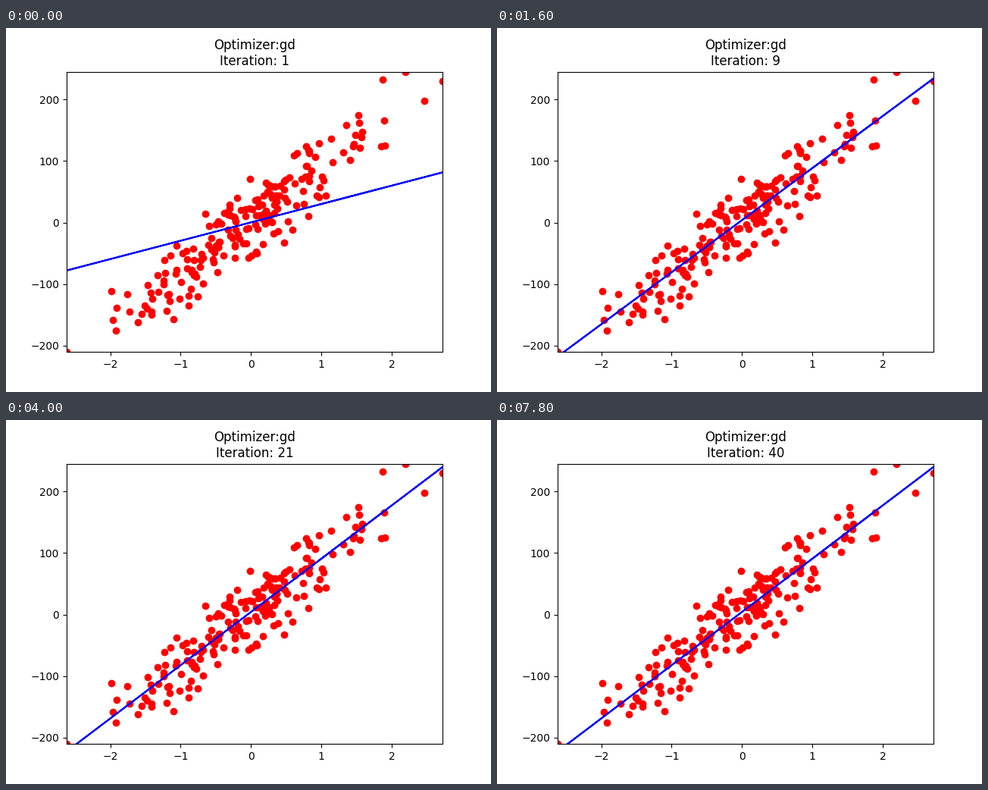
Animation, 640 px wide and 480 px high, one loop 8000 ms. Source, as a matplotlib script:

```python
import numpy as np
import matplotlib.pyplot as plt
from matplotlib.animation import FuncAnimation

FRAMES = 40
INTERVAL = 200
RATE = 0.4
NOISE = 30


def make_data(count=200, seed=42):
    """Noisy linear data: normal x, random slope, then shuffled."""
    rng = np.random.RandomState(seed)
    x = rng.standard_normal(count)
    slope = 100 * rng.uniform()
    y = slope * x + rng.normal(scale=NOISE, size=count)
    order = np.arange(count)
    rng.shuffle(order)
    return x[order], y[order]


def descend(x, y, steps):
    """Weights (bias, slope) after each gradient descent step."""
    design = np.column_stack([np.ones_like(x), x])
    weights = np.zeros(2)
    history = []
    for _ in range(steps):
        weights = weights - RATE * design.T @ (design @ weights - y) / len(x)
        history.append(weights)
    return history


x, y = make_data()
history = descend(x, y, FRAMES)

fig, ax = plt.subplots(figsize=(6.4, 4.8), dpi=100)
ax.scatter(x, y, color="red")
line, = ax.plot([], [], color="blue")
ax.set_xlim(x.min(), x.max())
ax.set_ylim(y.min(), y.max())
title = ax.set_title("")


def update(i):
    bias, slope = history[i]
    line.set_data(x, bias + slope * x)
    title.set_text(f"Optimizer:gd\nIteration: {i + 1}")
    return line, title


anim = FuncAnimation(fig, update, frames=FRAMES, interval=INTERVAL,
                     init_func=lambda: update(0), repeat=True,
                     repeat_delay=0, blit=False)
plt.show()
```
